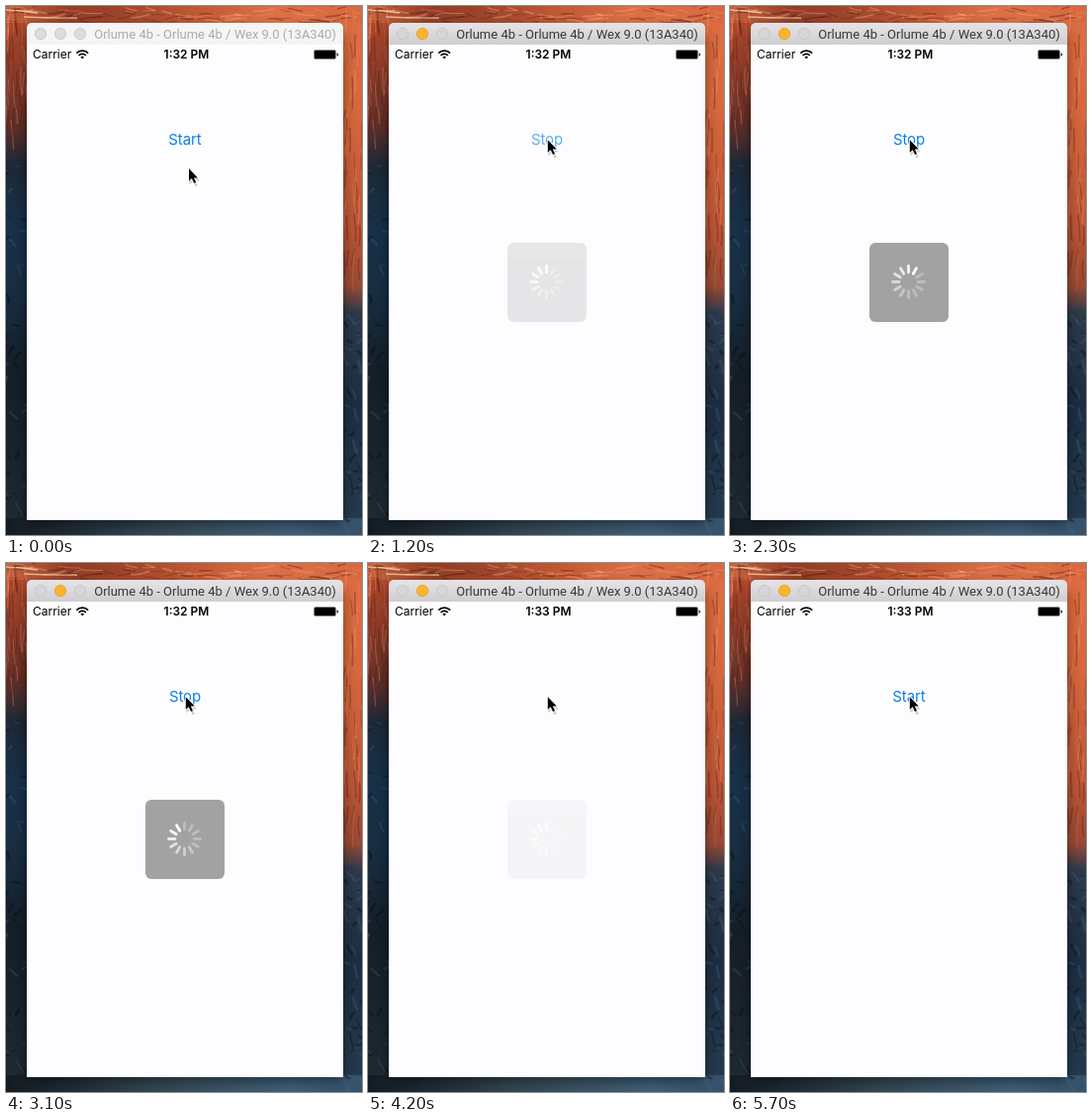
An HTML page with a canvas for the animation above (5800 ms loop, 360 by 534 pixels).

```html
<!DOCTYPE html>
<html lang="en">
<head>
<meta charset="utf-8">
<title>Loading indicator</title>
<style>
  html, body { margin: 0; width: 100%; height: 100%; overflow: hidden; background: #141e28; }
  canvas, svg { position: absolute; left: 0; top: 0; width: 360px; height: 534px; }
  text { text-anchor: middle; font-family: Inter, "Open Sans", sans-serif; }
  #title { font: 13px Roboto, "Liberation Sans", sans-serif; }
  .button { font-size: 15px; letter-spacing: -.1px; fill: #0a7fe8; }
</style>
</head>
<body>
<canvas id="wall" width="360" height="534"></canvas>
<svg viewBox="0 0 360 534">
  <defs>
    <linearGradient id="active" x2="0" y2="1">
      <stop offset="0" stop-color="#e6e4e6"/>
      <stop offset="1" stop-color="#cfcdd0"/>
    </linearGradient>
  </defs>
  <path id="bar" d="M21 39V22a5 5 0 0 1 5-5H336a5 5 0 0 1 5 5V39Z"/>
  <g id="lights" stroke="#c4c4c6" stroke-width=".8">
    <circle cx="35" cy="28" r="5.7"/>
    <circle id="amber" cx="55" cy="28" r="5.7"/>
    <circle cx="75" cy="28" r="5.7"/>
  </g>
  <text id="title" x="211.5" y="33">Orlume 4b - Orlume 4b / Wex 9.0 (13A340)</text>
  <rect x="21" y="39" width="320" height="480" fill="#fdfdff"/>

  <text x="27" y="53.3" font-size="12" style="text-anchor:start">Carrier</text>
  <g fill="none" stroke="#000" stroke-width="1.8">
    <path d="M71.3 47.6a8.2 8.2 0 0 1 11.8 0M73.6 50a5 5 0 0 1 7.2 0"/>
    <path d="M75.4 51.4L77.2 53.6L79 51.4Q77.2 50.2 75.4 51.4Z" fill="#000" stroke="none"/>
  </g>
  <text id="clock" x="182.5" y="53.3" font-size="12" font-weight="600"></text>
  <rect x="311.5" y="44.5" width="22" height="9" rx="1.5" fill="none" stroke="#000" stroke-opacity=".45"/>
  <rect x="312" y="45" width="21" height="8" rx=".8"/>
  <path d="M334.6 47.2q1.4 .4 1.4 1.8t-1.4 1.8Z"/>

  <text id="start" class="button" x="181" y="139.6">Start</text>
  <text id="stop" class="button" x="181" y="139.6">Stop</text>

  <g id="hud">
    <rect x="141" y="239" width="80" height="80" rx="6" fill="#a2a2a3"/>
    <g id="spokes" transform="translate(180.5 278.5)" stroke="#fff" stroke-width="2.8" stroke-linecap="round"></g>
  </g>

  <g id="cursor">
    <path d="M.6 2V16L4 13.4L6.6 18L9 17L7 12.4H11Z" opacity=".2"/>
    <path d="M0 0V12.8L2.9 10.1L5.2 14.9L7.2 14L5 9.4H9Z"
      stroke="#fff" stroke-width="1.8" paint-order="stroke" stroke-linejoin="round"/>
  </g>
</svg>
<script>
const began = performance.now();
const LOOP = 5800, STEP = 100, SPOKES = 12;
const $ = id => document.getElementById(id);

// Rows are [time, value]; linear between rows, constant outside.
function track(rows, t) {
  const next = rows.findIndex(([at]) => at >= t);
  if (next < 0) return rows[rows.length - 1][1];
  if (next === 0) return rows[0][1];
  const [t0, v0] = rows[next - 1], [t1, v1] = rows[next];
  return v0 + (v1 - v0) * (t - t0) / (t1 - t0);
}

const startFade = [[800, 1], [900, .2], [1000, .2], [1100, 0], [4200, 0], [4400, 1]];
const stopFade = [[1100, 0], [1200, .65], [1300, 1], [3900, 1], [4000, .2], [4100, .1], [4200, 0]];
const hudFade = [[1100, 0], [1200, .25], [1300, .75], [1400, 1], [3900, 1], [4000, .8], [4200, .08], [4300, 0]];

function paintWall() {
  const c = $("wall").getContext("2d");
  let seed = 7;
  const rnd = (lo, hi) => {
    seed = (seed * 16807) % 2147483647;
    return lo + (hi - lo) * seed / 2147483647;
  };
  const fill = (x, y, w, h, x2, y2, stops) => {
    const g = c.createLinearGradient(x, y, x2, y2);
    stops.forEach(([at, color]) => g.addColorStop(at, color));
    c.fillStyle = g;
    c.fillRect(x, y, w, h);
  };
  const line = (x, y, x2, y2, color, width) => {
    c.strokeStyle = color;
    c.lineWidth = width;
    c.beginPath();
    c.moveTo(x, y);
    c.quadraticCurveTo((x + x2) / 2 + rnd(-2, 2), (y + y2) / 2 + rnd(-2, 2), x2, y2);
    c.stroke();
  };

  fill(0, 0, 180, 534, 0, 534, [[0, "#b5492a"], [.1, "#98402a"], [.22, "#64302a"],
    [.3, "#1d2835"], [.42, "#173149"], [.55, "#182d40"], [.7, "#141e27"], [1, "#1f2a32"]]);
  fill(180, 0, 180, 534, 180, 534, [[0, "#dd6d43"], [.2, "#d8683e"], [.42, "#bd5636"],
    [.53, "#9a4a34"], [.58, "#2d3a4c"], [.75, "#1d2e42"], [1, "#263b4f"]]);
  fill(0, 0, 360, 17, 360, 0, [[0, "#c4623c"], [.18, "#923d26"], [.36, "#a1472c"],
    [.55, "#c25a36"], [.75, "#dc7047"], [1, "#d8683f"]]);
  fill(0, 517, 360, 17, 360, 517, [[0, "#131b22"], [.2, "#22303a"], [.4, "#344752"],
    [.6, "#3d5769"], [.8, "#41627d"], [1, "#35526c"]]);

  for (let i = 0; i < 70; i++) {
    const x = rnd(-10, 355), y = rnd(0, 17);
    line(x, y, x + rnd(6, 24), y + rnd(-4, 4), i % 2 ? "rgba(80,24,14,.4)" : "rgba(250,170,125,.4)", rnd(.6, 1.8));
  }
  line(0, 4, 32, 7, "rgba(255,222,190,.75)", 1.6);
  line(18, 11, 72, 12, "rgba(255,222,190,.7)", 1.4);
  for (let i = 0; i < 80; i++) {
    const right = i % 2, x = right ? rnd(341, 360) : rnd(0, 21);
    const y = right ? rnd(0, 260) : rnd(0, 120);
    line(x, y, x + rnd(-3, 3), y + rnd(12, 36), i % 4 < 2 ? "rgba(85,26,16,.35)" : "rgba(248,150,105,.32)", rnd(.6, 1.8));
  }
  for (let i = 0; i < 70; i++) {
    const right = i % 2, x = right ? rnd(340, 358) : rnd(-4, 18), y = rnd(right ? 310 : 160, 525);
    line(x, y, x + rnd(2, 9), y + rnd(-10, 16), i % 4 < 2 ? "rgba(0,0,0,.3)" : "rgba(80,110,135,.25)", rnd(1, 3));
  }

  c.shadowColor = "rgba(0,0,0,.5)";
  c.shadowBlur = 14;
  c.shadowOffsetY = 5;
  c.fillStyle = "#fdfdff";
  c.fillRect(22, 23, 318, 495);
}

const spokes = Array.from({ length: SPOKES }, (_, i) => {
  const spoke = document.createElementNS("http://www.w3.org/2000/svg", "path");
  spoke.setAttribute("d", "M0-9.6V-16");
  spoke.setAttribute("transform", `rotate(${i * 360 / SPOKES})`);
  return $("spokes").appendChild(spoke);
});

function render(t) {
  const active = t >= 1000;
  $("bar").setAttribute("fill", active ? "url(#active)" : "#f5f5f6");
  $("lights").setAttribute("fill", active ? "#d6d5d8" : "#dcdcde");
  $("amber").setAttribute("fill", active ? "#fdb32a" : "#dcdcde");
  $("amber").setAttribute("stroke", active ? "#e0a02c" : "#c4c4c6");
  $("title").setAttribute("fill", active ? "#38383a" : "#ababad");
  $("clock").textContent = t < 3700 ? "1:32 PM" : "1:33 PM";

  $("start").setAttribute("opacity", track(startFade, t));
  $("stop").setAttribute("opacity", track(stopFade, t));
  $("hud").setAttribute("opacity", track(hudFade, t));

  const head = Math.round((t + 800) % 1000 / 1000 * SPOKES);
  spokes.forEach((spoke, i) => {
    const age = (head - i + SPOKES) % SPOKES;
    spoke.setAttribute("opacity", Math.max(.28, 1 - age * .1));
  });

  const k = Math.min(1, Math.max(0, (t - 100) / 500));
  const ease = k * k * (3 - 2 * k);
  $("cursor").setAttribute("transform", `translate(${185 - 3.2 * ease} ${164 - 28.8 * ease})`);
}

paintWall();
function tick() {
  const t = (performance.now() - began) % LOOP;
  render(Math.floor(t / STEP) * STEP);
  requestAnimationFrame(tick);
}
tick();
</script>
</body>
</html>
```
